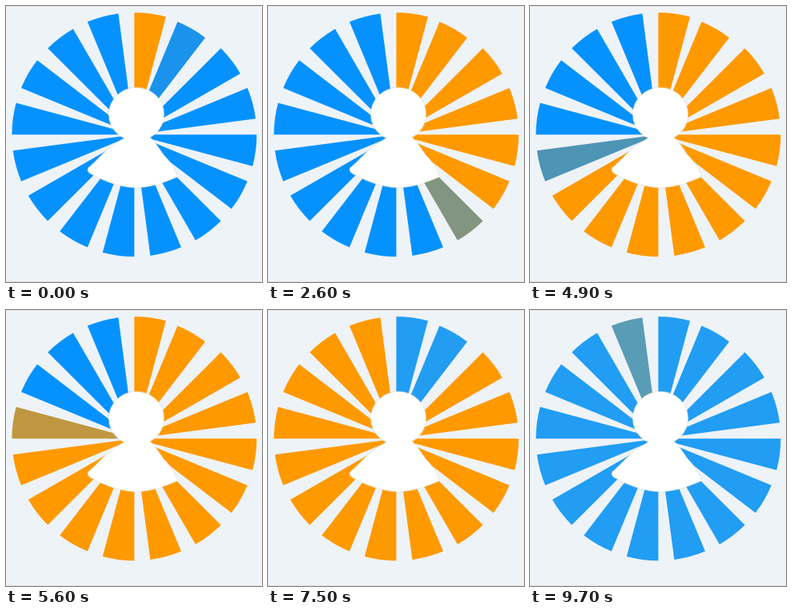
Animation, 320 px wide and 346 px high, one loop 9800 ms. Source, as an HTML page with a canvas:

```html
<!DOCTYPE html>
<html lang="en">
<head>
<meta charset="utf-8">
<title>Wheel loader</title>
<style>
  html, body { margin: 0; width: 100%; height: 100%; overflow: hidden; background: #eef3f8; }
  canvas { display: block; }
</style>
</head>
<body>
<canvas id="stage" width="320" height="346"></canvas>
<script>
const ctx = document.getElementById('stage').getContext('2d');
const LOOP = 9800, TICK = 100;
const COUNT = 16, RADIUS = 153, CX = 160.4, CY = 161.2;
const BLUE = [5, 146, 255], ORANGE = [255, 153, 0], PALE_BLUE = [33, 157, 244];

const clamp = v => Math.min(1, Math.max(0, v));
const mix = (a, b, k) => a.map((v, i) => Math.round(v + (b[i] - v) * k));

// Orange sweeps round slowly, then pale blue follows three times faster.
function wedgeColor(i, t) {
  const warm = clamp(1.08 + t / 480 - i);
  const cool = clamp((t - 7181) / 160 - i);
  return `rgb(${mix(mix(BLUE, ORANGE, warm), PALE_BLUE, cool)})`;
}

function drawWedge(i, color) {
  const start = (i * 22.5 - 90) * Math.PI / 180;
  const x = CX - (i === 1 ? 4.5 : 0);
  ctx.beginPath();
  ctx.moveTo(x, CY);
  ctx.arc(x, CY, RADIUS, start, start + Math.PI / 12);
  ctx.closePath();
  ctx.fillStyle = color;
  ctx.fill();
}

const body = new Path2D(`M151 164 C143 169 134 174 126 181 C117 189 110 198 103 203
  Q101 207 106 210 C122 219 142 227 163 227.5 C182 227 198 221 214 214
  C210 201 203 193 197 187 C191 179 187 171 180 165 Z`);
const head = new Path2D();
head.ellipse(163, 135.7, 34.3, 33.2, 0, 0, Math.PI * 2);

function drawFigure() {
  ctx.strokeStyle = 'rgba(228, 226, 212, 0.7)';
  ctx.lineWidth = 1.5;
  ctx.fillStyle = '#fff';
  ctx.stroke(body);
  ctx.stroke(head);
  ctx.fill(body);
  ctx.fill(head);
}

function frame(now) {
  const t = Math.floor(now % LOOP / TICK) * TICK;
  ctx.fillStyle = '#eef3f8';
  ctx.fillRect(0, 0, 320, 346);
  ctx.fillStyle = '#e0e4e8';
  ctx.fillRect(0, 0, 320, 1);
  ctx.fillRect(0, 345, 320, 1);
  for (let i = 0; i < COUNT; i++) drawWedge(i, wedgeColor(i, t));
  drawFigure();
}

const origin = performance.now();
function loop() {
  frame(performance.now() - origin);
  requestAnimationFrame(loop);
}
loop();
</script>
</body>
</html>
```
